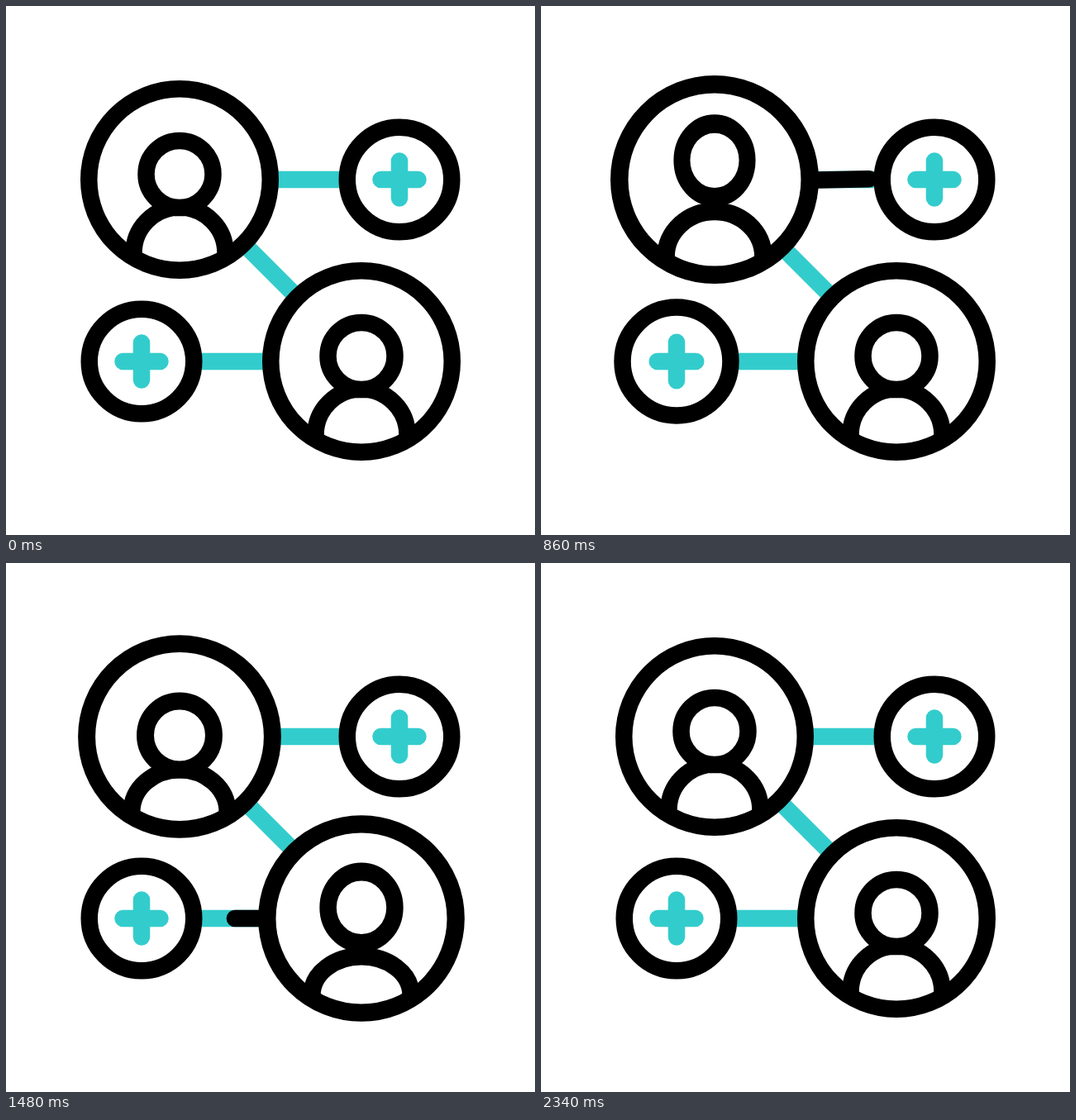
An HTML page for the animation above (2.8 s loop, 640 by 640 pixels).

```html
<!DOCTYPE html>
<html lang="en">
<head>
<meta charset="utf-8">
<title>Connected people</title>
<style>
  html, body { margin: 0; width: 100%; height: 100%; overflow: hidden; background: #fff; }
  svg { display: block; width: 100%; height: 100%; }
  .ink { stroke: #000; stroke-width: 20.5; fill: #fff; }
  .teal { stroke: #33cccc; stroke-width: 20.5; fill: none; }
  .round { stroke-linecap: round; }
  .open { fill: none; }
</style>
</head>
<body>
<svg id="stage" viewBox="0 0 640 640"></svg>
<script>
const LOOP = 2800, STEP = 20, LAG = 540;
const svg = document.getElementById('stage');

const sine = u => (1 - Math.cos(Math.PI * u)) / 2;
const out = u => 1 - (1 - u) * (1 - u);

// Each track is a list of [time, value, easing towards it].
const badgeScale = [[220, 1], [420, 1.07], [560, 0.84], [720, 1.025], [880, 1]];
const discScale = [[420, 1], [880, 1.05, out], [1180, 0.948], [1380, 1.028], [1780, 1]];
const bodyHeight = [[500, 55.5], [700, 69], [960, 44.5], [1200, 65], [1460, 50], [1790, 55.5]];
const headY = [[640, -6.5], [820, -23.5], [1060, -2], [1220, -6.6], [1460, -1.4], [1800, -6.5]];
const headWidth = [[660, 1], [850, 0.93], [1050, 1]];
const lineIn = [[380, 0], [540, 1]];
const lineOut = [[810, 0], [1090, 1]];

function at(track, t) {
  if (t <= track[0][0]) return track[0][1];
  for (let i = 1; i < track.length; i++) {
    const [t0, v0] = track[i - 1], [t1, v1, ease = sine] = track[i];
    if (t < t1) return v0 + (v1 - v0) * ease((t - t0) / (t1 - t0));
  }
  return track[track.length - 1][1];
}

function add(parent, tag, attrs) {
  const el = document.createElementNS('http://www.w3.org/2000/svg', tag);
  set(el, attrs);
  parent.appendChild(el);
  return el;
}

function set(el, attrs) {
  for (const key in attrs) el.setAttribute(key, attrs[key]);
}

add(svg, 'path', { class: 'teal', d: 'M210 210L430 430' });

// A person disc with a plus badge beside it; dir points from disc to badge.
function makePair(x, y, badgeX, tilt, lag) {
  const dir = Math.sign(badgeX - x);
  add(svg, 'path', { class: 'teal', d: `M${x} ${y}H${badgeX}` });
  const signal = add(svg, 'path', { class: 'ink round' });

  const badge = add(svg, 'g', { transform: `translate(${badgeX} ${y})` });
  const ring = add(badge, 'circle', { class: 'ink' });
  const plus = add(badge, 'path', { class: 'teal round' });

  const disc = add(svg, 'g', {});
  add(disc, 'circle', { class: 'ink', r: 109.75 });
  const body = add(disc, 'path', { class: 'ink open' });
  const head = add(disc, 'circle', { class: 'ink', r: 40.5 });

  const from = x + dir * 194, to = x + dir * 102;
  const spot = p => `${from + (to - from) * p} ${y + tilt * (2 * p - 1)}`;

  return time => {
    const t = time - lag;

    const b = at(badgeScale, t), arm = 22.5 * b;
    set(ring, { r: 63.25 * b });
    set(plus, { d: `M${-arm} 0H${arm}M0 ${-arm}V${arm}` });

    const start = at(lineOut, t), end = at(lineIn, t);
    set(signal, {
      d: `M${spot(start)}L${spot(end)}`,
      visibility: end > 0 && start < 1 ? 'visible' : 'hidden'
    });

    set(disc, { transform: `translate(${x} ${y}) scale(${at(discScale, t)})` });
    const ry = at(bodyHeight, t), rx = 55.5 + (55.5 - ry) * 0.2;
    set(body, { d: `M${-rx} 93V89A${rx} ${ry} 0 0 1 ${rx} 89V93` });
    const w = at(headWidth, t);
    set(head, { transform: `translate(0 ${at(headY, t)}) scale(${w} ${1 + (1 - w) * 0.65})` });
  };
}

const pairs = [
  makePair(210, 210, 476, 0.9, 0),
  makePair(430, 430, 164, 0, LAG)
];

function draw(now) {
  const time = Math.floor((now % LOOP) / STEP) * STEP;
  pairs.forEach(update => update(time));
}

const begin = performance.now();
function tick() {
  draw(performance.now() - begin);
  requestAnimationFrame(tick);
}
tick();
</script>
</body>
</html>
```
